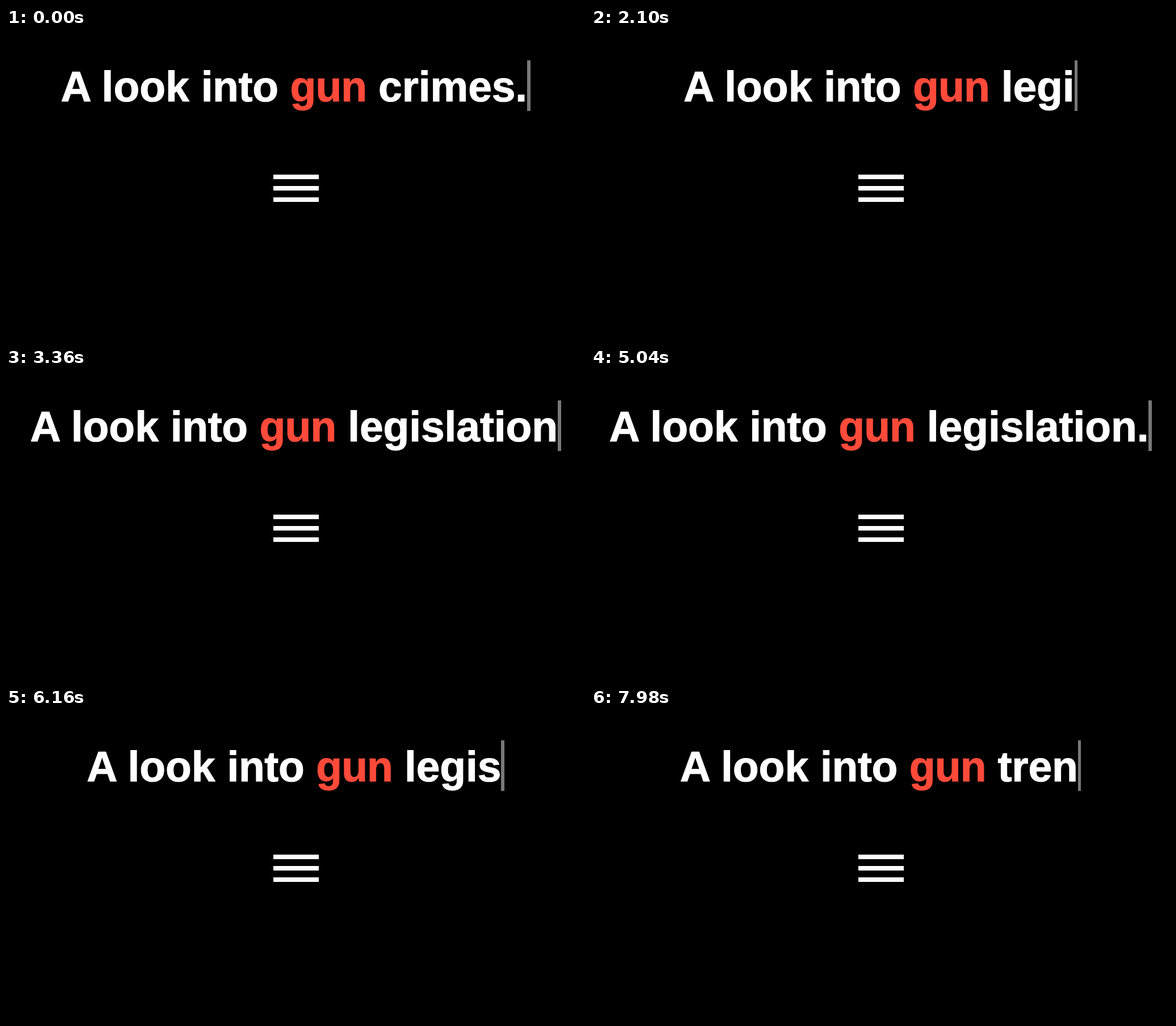
Recreate the animation shown at these times as an HTML page. Size 1020 by 549 pixels, loop 8 s.

```html
<!DOCTYPE html>
<html lang="en">
<head>
<meta charset="utf-8">
<title>Typing headline</title>
<style>
  html, body { margin: 0; width: 100%; height: 100%; overflow: hidden; background: #000; }
  .stage { position: relative; width: 1020px; height: 549px; overflow: hidden; background: #000; }
  h1 {
    position: absolute; left: 0; top: 57px; width: 1020px; height: 89px; margin: 0;
    display: flex; justify-content: center;
    font: bold 75px/92px "Liberation Sans", Arial, sans-serif;
    font-kerning: none; text-rendering: geometricPrecision;
    -webkit-text-stroke: 1.1px currentColor;
    white-space: pre; color: #fff;
  }
  .cap { letter-spacing: -2.8px; }
  .into { letter-spacing: -.35px; }
  .gun { letter-spacing: -.9px; color: #ff4a3a; }
  #tail { letter-spacing: -.1px; }
  .caret { flex: none; width: 5.5px; height: 89px; background: #787878; }
  .menu {
    position: absolute; left: 471px; top: 258px; width: 80px; height: 8px;
    background: #fff; box-shadow: 0 20px #fff, 0 40px #fff;
  }
</style>
</head>
<body>
<div class="stage">
  <h1><span><span class="cap">A</span> look <span class="into">into</span> <span class="gun">gun</span> <span id="tail">crimes.</span></span><i class="caret"></i></h1>
  <div class="menu"></div>
</div>
<script>
  const LOOP = 8000, STEP = 70;
  const tail = document.getElementById('tail');

  // First and last key press, in ms, for typing and erasing each ending.
  const phrases = [
    { text: 'crimes.', type: [0, 0], erase: [280, 820] },
    { text: 'legislation.', type: [1680, 3530], erase: [5620, 6533] },
    { text: 'tren', type: [7560, 7980], erase: [LOOP, LOOP] }
  ];

  // Number of keys pressed by time t; an ease above 1 slows the typing down.
  function pressed([first, last], count, ease, t) {
    let n = 0;
    while (n < count && first + (last - first) * (n / (count - 1)) ** ease <= t) n++;
    return n;
  }

  function draw(now) {
    const t = Math.floor(now % LOOP / STEP) * STEP;
    const { text, type, erase } = phrases.findLast(p => p.type[0] <= t);
    const count = text.length;
    const shown = text.slice(0, pressed(type, count, 1.15, t) - pressed(erase, count, 1, t));
    if (tail.textContent !== shown) tail.textContent = shown;
  }

  function tick() {
    draw(performance.now());
    requestAnimationFrame(tick);
  }
  tick();
</script>
</body>
</html>
```
